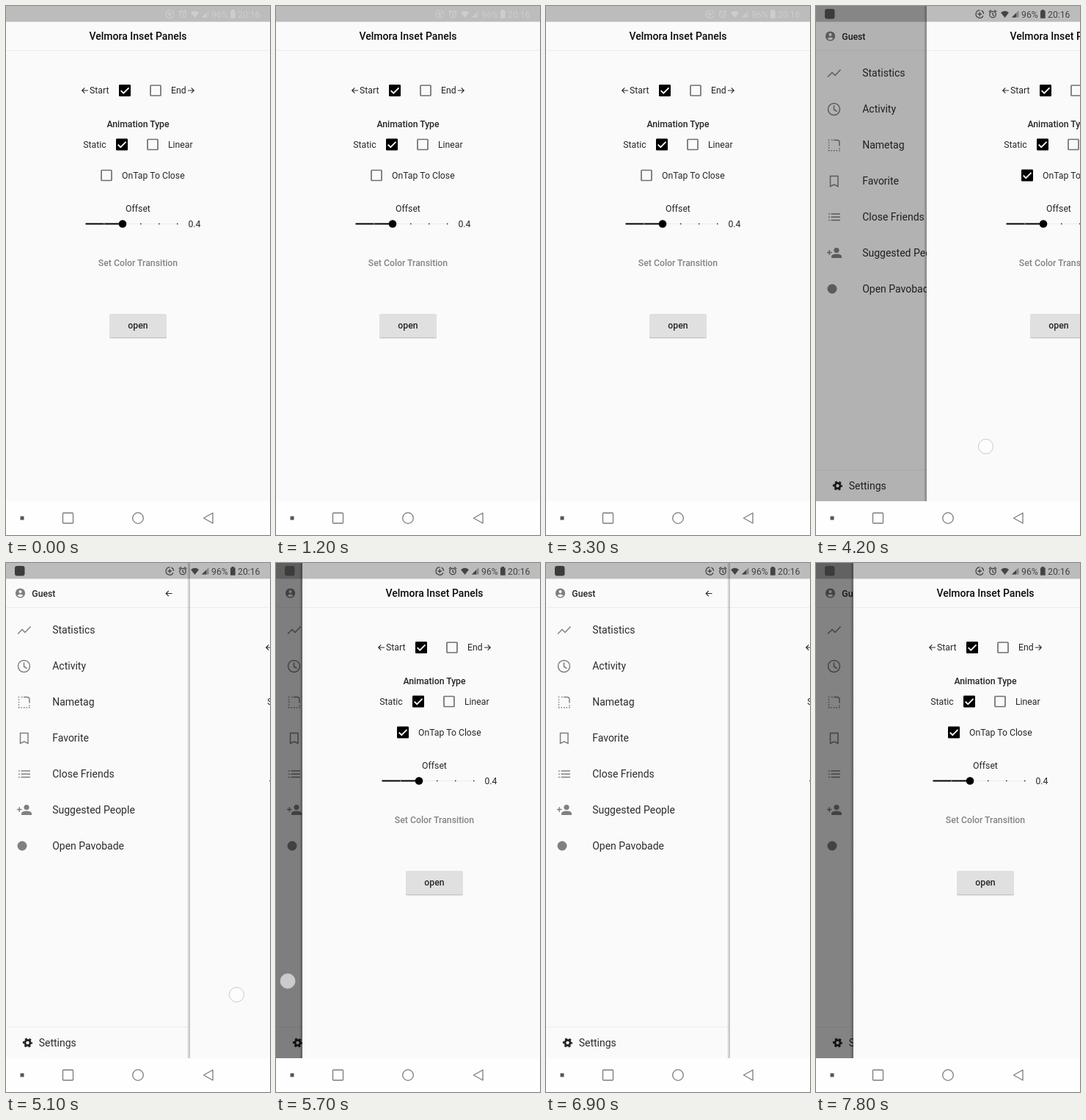
An HTML page that plays this animation: 360 by 720 pixels, repeating every 8000 ms.

```html
<!DOCTYPE html>
<html lang="en">
<head>
<meta charset="utf-8">
<title>Sliding drawer</title>
<style>
  html, body { margin: 0; width: 100%; height: 100%; overflow: hidden; background: #fafafa; }
  svg { display: block; width: 100vw; height: 100vh; font: 12.25px Roboto, sans-serif; }
  text { fill: #262626; }
  .mid { text-anchor: middle; }
  .bold { font-weight: 500; }
  .title { font-size: 14px; fill: #0a0a0a; }
  .row { font-size: 14px; fill: #2c2c2c; }
  .line { fill: none; stroke: #808080; stroke-width: 1.5; }
  .arrow { fill: none; stroke: #2a2a2a; stroke-width: 1.15; }
  .solid { fill: #808080; }
  .rule { stroke: #ededed; }
  #status { color: #444; }
  #status text { fill: currentColor; }
  #status.light { color: #fff; opacity: .25; }
  #status.light #badge { display: none; }
</style>
</head>
<body>
<svg viewBox="0 0 360 720" preserveAspectRatio="none">
  <defs>
    <linearGradient id="edge">
      <stop offset="0" stop-color="#000" stop-opacity="0"/>
      <stop offset=".5" stop-color="#000" stop-opacity=".17"/>
      <stop offset="1" stop-color="#000" stop-opacity=".22"/>
    </linearGradient>
    <path id="left" class="arrow" d="M9 0H.8M4.3-3.6.7 0l3.6 3.6"/>
    <rect id="empty" class="line" x="-7" y="-7" width="14" height="14" rx=".8" style="stroke:#707070;stroke-width:1.7"/>
    <g id="checked">
      <rect x="-8" y="-8" width="16" height="16" rx="1.3"/>
      <path d="M-5.3.2-1.8 3.7 5.5-3.7" fill="none" stroke="#fff" stroke-width="1.8"/>
    </g>
  </defs>

  <g id="drawer">
    <rect width="360" height="674" fill="#fafafa"/>
    <path class="rule" d="M0 60.5H252M0 631.5H252"/>
    <circle class="solid" cx="19.5" cy="41" r="6.6"/>
    <circle cx="19.5" cy="39" r="2" fill="#fafafa"/>
    <path d="M15.5 44.2q4-3.4 8 0q-4 4-8 0z" fill="#fafafa"/>
    <text class="bold" x="35.3" y="46">Guest</text>
    <use href="#left" x="217.5" y="41.5"/>
    <g id="rows"></g>

    <path class="line" d="M16 96.5 22 90.5l4 4 7.5-8"/>
    <circle class="line" cx="24.5" cy="140.5" r="8"/>
    <path class="line" d="M24.5 135.5v5.5l4 2.5"/>
    <path class="line" d="M24 182.5h4.5q3.5 0 3.5 3.5v4.5"/>
    <path class="line" d="M17.5 181.7v16M17 196.7h16" stroke-dasharray="1.6 1.9"/>
    <path class="line" d="M21 182.5h1.5M32 193.5v1.5"/>
    <path class="line" d="M19.5 231.5h10.5v14l-5.25-2.5-5.25 2.5z"/>
    <path class="line" d="M17 283h1.7m1.8 0H33M17 287.2h1.7m1.8 0H33M17 291.4h1.7m1.8 0H33"/>
    <path class="line" d="M15 335.5h6.5M18.25 332.2v6.6"/>
    <circle class="solid" cx="28" cy="332.5" r="3.6"/>
    <path class="solid" d="M21 343v-2q0-3.5 7-3.5t7 3.5v2z"/>
    <circle class="solid" cx="22" cy="385" r="6.5"/>
    <g transform="translate(29.5 653)" fill="none" stroke="#222">
      <circle r="3.6" stroke-width="2.8"/>
      <circle r="5.6" stroke-width="2" stroke-dasharray="2.932" stroke-dashoffset="1.466"/>
    </g>
    <text class="row" x="44.7" y="658">Settings</text>
  </g>
  <rect id="shade" width="360" height="674"/>

  <g id="page">
    <rect x="-4" width="4" height="674" fill="url(#edge)"/>
    <rect width="360" height="674" fill="#fafafa"/>
    <path class="rule" d="M0 60.5H360"/>
    <text class="mid bold title" x="180" y="46">Velmora Inset Panels</text>

    <use href="#left" x="103" y="115"/>
    <text x="114" y="119.3">Start</text>
    <use href="#checked" x="162" y="115"/>
    <use href="#empty" x="204" y="115"/>
    <text x="225" y="119.3">End</text>
    <use href="#left" transform="translate(257 115) scale(-1 1)"/>

    <text class="mid bold" x="180" y="164.8">Animation Type</text>
    <text x="105.3" y="192.8">Static</text>
    <use href="#checked" x="158" y="188.5"/>
    <use href="#empty" x="200" y="188.5"/>
    <text x="221" y="192.8">Linear</text>

    <use id="tapBox" href="#empty" x="137" y="230.5"/>
    <text x="158" y="234.8">OnTap To Close</text>

    <text class="mid" x="180" y="280.3">Offset</text>
    <path d="M159 296.5h75" stroke="#ececec"/>
    <path d="M108.5 296.5h50" stroke="#000" stroke-width="2"/>
    <path d="M133 296.5h1.5" stroke="#888" stroke-width="1.5"/>
    <path d="M183 296.5h1.5m23.5 0h1.5m23.5 0h1.5" stroke="#222" stroke-width="1.5"/>
    <circle cx="159" cy="296.5" r="5.3"/>
    <text x="248.4" y="301.2">0.4</text>

    <text class="mid bold" x="180" y="353.8" style="fill:#848484">Set Color Transition</text>

    <rect x="141" y="421" width="78" height="32" rx="2" opacity=".08"/>
    <rect x="141" y="420" width="78" height="32" rx="2" opacity=".15"/>
    <rect x="141" y="419" width="78" height="32" rx="2" fill="#e0e0e0"/>
    <text class="mid bold" x="180" y="439">open</text>
  </g>

  <rect width="360" height="21.5" opacity=".25"/>
  <g id="status" fill="currentColor">
    <rect id="badge" x="12" y="4" width="13.5" height="13.5" rx="3" fill="#3c3c3c"/>
    <g fill="none" stroke="currentColor" stroke-width="1.3">
      <path d="M228 13.2A5.2 5.2 0 1 1 223.5 5.8M220.5 11h5.5M223.25 8.25v5.5M225.5 6.2a5 5 0 0 1 3 4.6"/>
      <circle cx="241" cy="11.5" r="4.2"/>
      <path d="M241 9v3l2 1M235.8 8l3-2.5M246.2 8l-3-2.5"/>
    </g>
    <path d="M252 9q5.5-4.5 11 0l-5.5 7z"/>
    <path d="M267 15.5 276.5 6v9.5z" opacity=".45"/>
    <path d="M267 15.5l6-6v6z"/>
    <text x="280" y="15.5">96%</text>
    <path d="M306 6.5h1.5V5h3.5v1.5h1.7v10.2H306z"/>
    <text x="316" y="15.5">20:16</text>
  </g>

  <rect y="674" width="360" height="46" fill="#fefefe"/>
  <rect x="19.5" y="694.5" width="5" height="5" fill="#555"/>
  <g fill="none" stroke="#7c7c7c" stroke-width="1.3">
    <rect x="77.5" y="690" width="14" height="14" rx="1"/>
    <circle cx="180" cy="697" r="7.3"/>
    <path d="M269.5 697 282 690v14z" stroke-linejoin="round"/>
  </g>
  <circle id="touch" r="10" fill="#fff" fill-opacity=".6" stroke="#c8c8c8"/>
</svg>
<script>
const LOOP = 8000, STEP = 300, OPEN = 251;
const $ = id => document.getElementById(id);

["Statistics", "Activity", "Nametag", "Favorite", "Close Friends", "Suggested People", "Open Pavobade"]
  .forEach((label, i) => {
    const row = document.createElementNS("http://www.w3.org/2000/svg", "text");
    row.setAttribute("class", "row");
    row.setAttribute("x", 63.2);
    row.setAttribute("y", 96 + i * 49);
    row.textContent = label;
    $("rows").append(row);
  });

// [time, page shift]
const slide = [
  [0, 0], [1800, 0], [2100, 77], [2400, OPEN], [2700, OPEN], [3000, 0],
  [3900, 0], [4200, 151], [4500, OPEN], [5100, OPEN], [5700, 36], [6000, 0],
  [6300, 0], [6600, 126], [6900, OPEN], [7500, OPEN], [7800, 51], [LOOP, 0]
];
// strokes of [time, x, y]
const strokes = [
  [[1800, 8, 552], [2100, 119.5, 557]],
  [[3900, 8, 592], [4200, 231.5, 599.5]],
  [[5100, 314.5, 587.5], [5700, 16, 569]],
  [[6300, 8, 570], [6600, 190, 575]]
];

function at(keys, t) {
  const i = Math.max(1, keys.findIndex(k => k[0] >= t));
  const a = keys[i - 1], b = keys[i], p = (t - a[0]) / (b[0] - a[0]);
  return a.slice(1).map((v, n) => v + (b[n + 1] - v) * p);
}

function draw(now) {
  const t = Math.floor(now % LOOP / STEP) * STEP;
  const [x] = at(slide, t);
  $("page").setAttribute("transform", `translate(${x} 0)`);
  $("shade").setAttribute("opacity", 0.52 * (1 - (x / OPEN) ** 1.6));
  $("status").setAttribute("class", x < 1 ? "light" : "");
  $("tapBox").setAttribute("href", t < 3600 ? "#empty" : "#checked");

  const stroke = strokes.find(s => t >= s[0][0] && t <= s[1][0]);
  $("touch").setAttribute("visibility", stroke ? "visible" : "hidden");
  if (stroke) $("touch").setAttribute("transform", `translate(${at(stroke, t)})`);
}

const start = performance.now();
function tick() {
  draw(performance.now() - start);
  requestAnimationFrame(tick);
}
tick();
</script>
</body>
</html>
```
